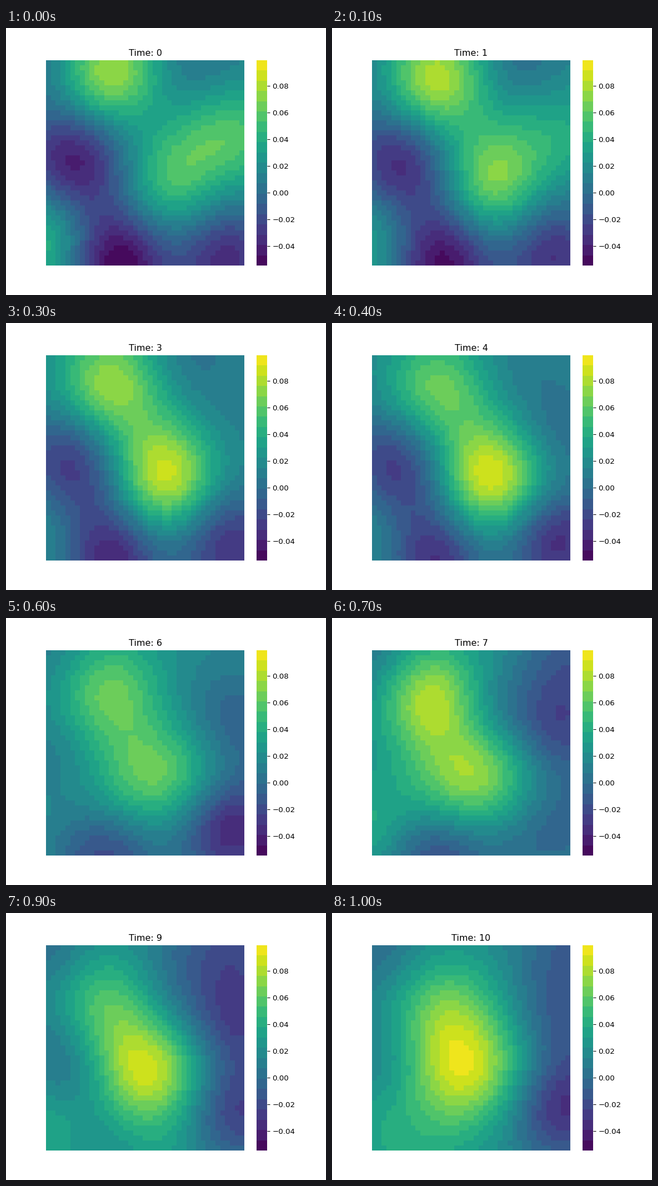
Animation, 576 px wide and 480 px high, one loop 1.1 s. Source, as a matplotlib script:

```python
import numpy as np
import matplotlib.pyplot as plt
from matplotlib.animation import FuncAnimation
from matplotlib.colors import ListedColormap

CELLS, FRAMES, BANDS = 41, 11, 20
VMIN, VMAX = -0.0545, 0.0995
LEVEL, REACH = 20, 0.19   # resting height and width of influence


class Anchor:
    """A drifting point of the surface; heights (in thousandths) by time."""

    def __init__(self, start, end=None, **heights):
        self.start = np.array(start)
        self.drift = np.array(end or start) - self.start
        self.times = [int(k[1:]) for k in heights]
        self.heights = list(heights.values())

    def place(self, t):
        return self.start + self.drift * t / (FRAMES - 1)

    def height(self, t):
        return np.interp(t, self.times, self.heights)


anchors = [
    # warm hills and the ridge joining them
    Anchor((.32, .07), (.33, .32), t0=75, t2=87, t4=64, t6=66, t7=82, t9=62, t10=72),
    Anchor((.65, .58), (.47, .61), t0=56, t2=83, t4=90, t6=65, t7=76, t9=90, t10=94),
    Anchor((.50, .30), t0=34, t2=65, t6=53, t9=45, t10=66),
    Anchor((.80, .60), t0=46, t4=46, t6=24, t10=13),
    # right side, cooling down
    Anchor((.92, .38), (.95, .38), t0=60, t2=28, t4=6, t6=-4, t7=-22, t9=-27, t10=-13),
    Anchor((.90, .98), (.95, .78), t0=-36, t2=-27, t6=-36, t7=-4, t10=-32),
    # left side and bottom, warming up
    Anchor((.13, .47), (.09, .57), t0=-40, t2=-23, t4=-23, t7=38, t9=12, t10=27),
    Anchor((.28, .68), t0=-22, t4=-5, t7=50, t9=43, t10=66),
    Anchor((.37, 1.0), (.25, 1.0), t0=-55, t2=-45, t7=-12, t10=40),
    Anchor((.62, .98), t0=-20, t4=5, t7=4, t9=32, t10=24),
    Anchor((.01, .88), t0=38, t2=14, t6=13, t7=36),
    # top edge
    Anchor((0, 0), t0=12, t2=27, t10=0),
    Anchor((.72, 0), t0=9, t2=4, t6=19, t9=-7, t10=10),
    Anchor((1, 0), t0=15, t6=14, t7=-12, t9=-17, t10=-9),
]


def kernel(a, b):
    dist2 = ((a[:, None] - b[None]) ** 2).sum(-1)
    return np.exp(-dist2 / (2 * REACH ** 2))


axis = (np.arange(CELLS) + 0.5) / CELLS
grid = np.stack(np.meshgrid(axis, axis), -1).reshape(-1, 2)


def surface(t):
    """Smooth surface through all anchors at time t."""
    places = np.array([a.place(t) for a in anchors])
    heights = np.array([a.height(t) for a in anchors])
    weights = np.linalg.solve(kernel(places, places), heights - LEVEL)
    return (kernel(grid, places) @ weights + LEVEL).reshape(CELLS, CELLS) / 1000


cmap = ListedColormap(plt.cm.viridis((np.arange(BANDS) + 0.5) / BANDS))

fig, ax = plt.subplots(figsize=(6, 5), dpi=96)
mesh = ax.pcolormesh(surface(0), cmap=cmap, vmin=VMIN, vmax=VMAX)
ax.invert_yaxis()
ax.axis("off")
bar = fig.colorbar(mesh, ax=ax)
bar.outline.set_visible(False)
title = ax.set_title("Time: 0")


def update(t):
    mesh.set_array(surface(t))
    title.set_text(f"Time: {t}")
    return mesh, title


anim = FuncAnimation(fig, update, frames=FRAMES, interval=100, repeat=True,
                     repeat_delay=0, blit=False)
plt.show()
```
